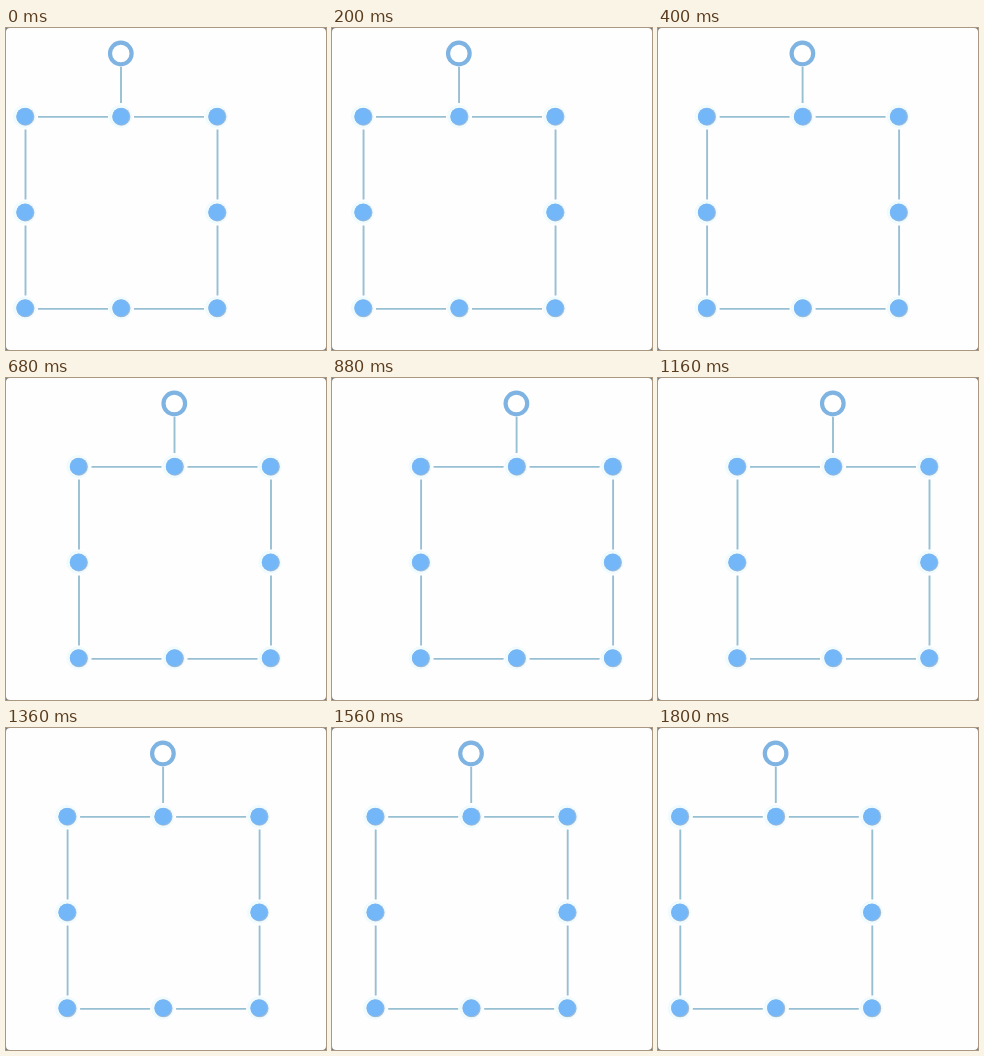
Animation of 320 by 322 pixels, one loop 1.84 s. Source, as an HTML page:

```html
<!DOCTYPE html>
<html>
<head>
<meta charset="utf-8">
<style>
html, body { margin: 0; width: 100%; height: 100%; overflow: hidden; background: #fff; }
svg { display: block; }
</style>
</head>
<body>
<svg width="320" height="322" viewBox="0 0 320 322">
  <rect width="320" height="322" fill="#777"/>
  <rect width="320" height="322" rx="4" fill="#fefefe"/>
  <defs>
    <g id="dot">
      <circle r="11.5" cx="-.5" fill="#f0fbfe"/>
      <circle r="9" cx=".4" cy=".2" fill="#a5b9cf"/>
      <circle r="8.5" cx="-.2" fill="#74b7f8"/>
    </g>
  </defs>
  <g id="box">
    <path id="lines" fill="none" stroke="#98c0d3" stroke-width="1.9"/>
    <circle cx="95.8" cy="25.5" r="10.8" fill="#fff" stroke="#7eb3e2" stroke-width="4.2"/>
  </g>
</svg>
<script>
const LOOP = 1840, STEP = 40, SIDE = 192, HALF = 96, TOP = 88.5, GAP = 13;
const box = document.getElementById('box');

// Sides, each broken around its handles, plus the stem of the rotation knob
let d = 'M96 39V75';
for (const far of [0, SIDE])
  for (const start of [0, HALF]) {
    const len = HALF - 2 * GAP;
    d += `M${start + GAP} ${TOP + far + .4}h${len}M${far + .5} ${TOP + start + GAP}v${len}`;
  }
document.getElementById('lines').setAttribute('d', d);

for (let row = 0; row < 3; row++)
  for (let col = 0; col < 3; col++) {
    if (row === 1 && col === 1) continue;
    const dot = document.createElementNS('http://www.w3.org/2000/svg', 'use');
    dot.setAttribute('href', '#dot');
    dot.setAttribute('x', col * HALF);
    dot.setAttribute('y', TOP + row * (HALF - .2));
    box.append(dot);
  }

// Time in ms and x of the left side
const path = [[0, 19], [40, 17], [400, 48.6], [680, 72.5], [880, 88.6], [965, 95.5],
  [1160, 79], [1560, 43.2], [1800, 21.8], [LOOP, 19]];

function leftAt(t) {
  const i = path.findIndex(p => p[0] > t);
  const [t0, x0] = path[i - 1], [t1, x1] = path[i];
  return x0 + (x1 - x0) * (t - t0) / (t1 - t0);
}

function draw() {
  const t = Math.floor(performance.now() % LOOP / STEP) * STEP;
  box.setAttribute('transform', `translate(${leftAt(t)} 0)`);
  requestAnimationFrame(draw);
}
draw();
</script>
</body>
</html>
```
